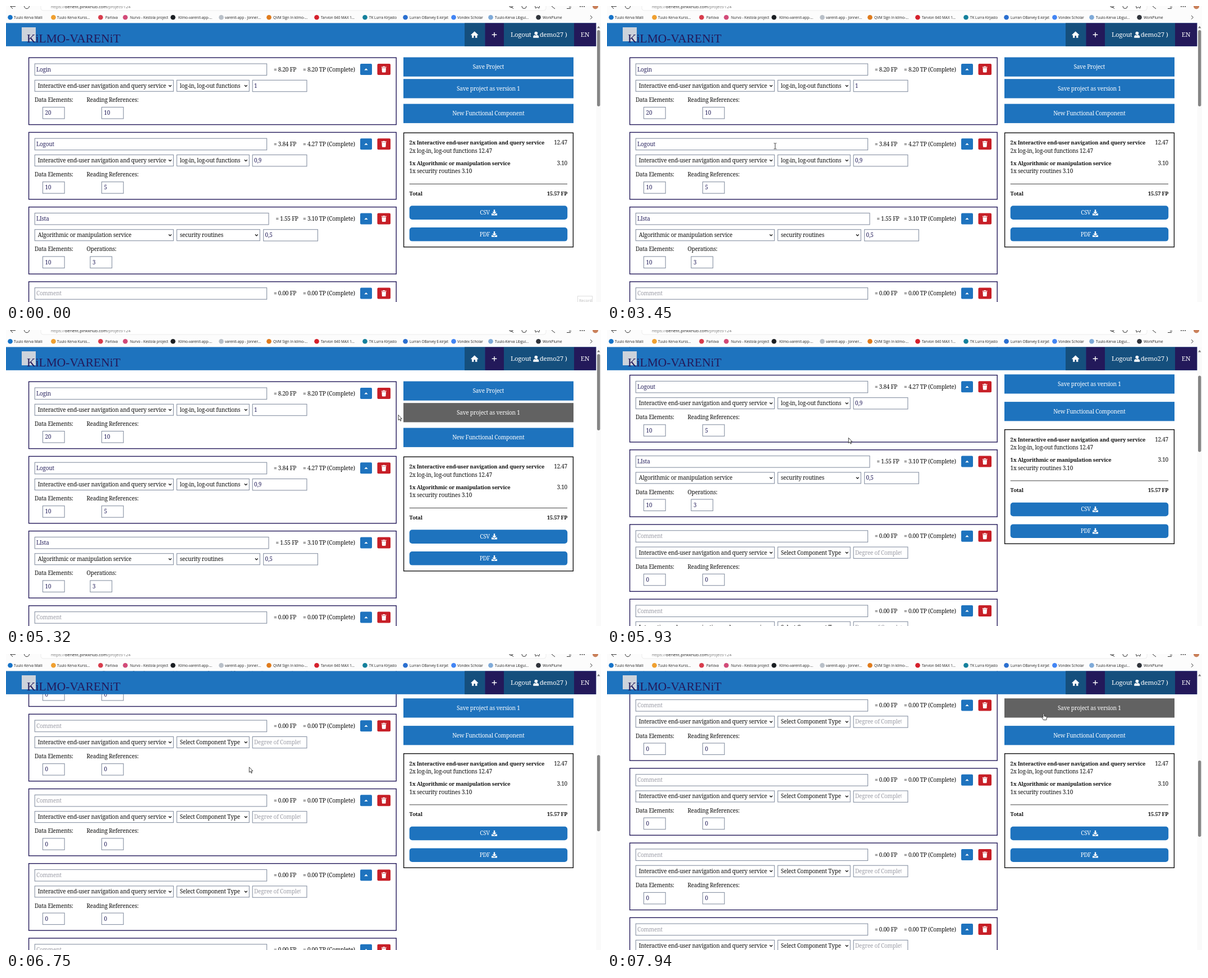
Write an HTML page that moves like this. It is 1060 by 528 pixels and loops after 8000 ms.

```html
<!DOCTYPE html>
<html lang="en">
<head>
<meta charset="utf-8">
<title>Function point calculator</title>
<style>
  html, body { margin: 0; width: 100%; height: 100%; overflow: hidden; background: #fff; }
  svg { display: block; width: 1060px; height: 528px; }
  text { font: 10px "Noto Serif", serif; letter-spacing: -.02em; fill: #111; white-space: pre; }
  .bold { font-size: 9.35px; font-weight: 700; }
  .value { fill: #2a2560; }
  .hint { fill: #9b9ca6; }
  .white { fill: #fff; }
  .nav { font-size: 11.5px; fill: #fff; }
  .ui { font: 6.4px "Open Sans", sans-serif; letter-spacing: 0; fill: #222; }
  .url { font-size: 7.35px; fill: #777; }
  .logo { font: 21.5px "Liberation Serif", serif; letter-spacing: 0; fill: #23195a; }
  .field { fill: #fff; stroke: #8791a3; stroke-width: 1.1; }
  .frame { fill: #fff; stroke: #23195a; stroke-width: 1.4; }
  .line { fill: none; stroke: #333; stroke-width: 1; }
  .blue { fill: #1e73be; }
  .hover { fill: #626262; }
</style>
</head>
<body>
<svg id="stage" viewBox="0 0 1060 528">
  <defs>
    <clipPath id="hintClip"><rect x="439" y="130" width="85.5" height="24"/></clipPath>
    <path id="trash" fill="#fff" d="M-4.4-4.6h2.6l.6-.9h2.4l.6.9h2.6v1.3h-8.8zM-3.8-2.6h7.6l-.5 7.2q-.1.9-1 .9h-4.6q-.9 0-1-.9z"/>
    <path id="caret" fill="#fff" d="M-3.2 1.6 0-1.7 3.2 1.6z"/>
    <path id="chevron" fill="none" stroke="#111" stroke-width="1.3" d="M-2.4-1.2 0 1.2 2.4-1.2"/>
    <path id="download" fill="#fff" d="M-1.2-5h2.4v4h2.6L0 2.9-3.8-1h2.6zM-5 1.8h2.6L0 4.2l2.4-2.4H5v3.3H-5z"/>
    <path id="home" fill="#fff" d="M0-6 6.6.1 5.7 1.1 4.7.3v5.2H1.3V1.8h-2.6v3.7h-3.4V.3l-1 .8-.9-1z"/>
    <path id="person" fill="#fff" d="M0-5.6a2.8 2.9 0 0 1 0 5.8a2.8 2.9 0 0 1 0-5.8M-5 5.5v-1.6q0-3 3-3.1q2 1 4 0q3 .1 3 3.1v1.6z"/>
  </defs>
  <g id="cards"></g>
  <g id="side"></g>
  <g id="chrome"></g>
  <rect id="thumb" x="1053" y="43" width="5.4" height="136" rx="2.7" fill="#858585"/>
  <g id="record">
    <rect x="1018.5" y="517.5" width="26" height="14" fill="#fff" stroke="#ddd"/>
    <text class="ui" x="1021" y="528" style="fill:#bbb;font-size:7px">Record</text>
  </g>
  <g id="pointer" stroke="#111" stroke-width=".8" stroke-linejoin="round" fill="#fff">
    <path id="arrow" d="M.3.3v9.4l2.2-2 1.5 3.4 1.4-.6L4 7.2h2.8z"/>
    <path id="hand" d="M-1.2 1.2q1.1-1.7 2.1 0v3.6l3.8.8q1 .3.9 1.4l-.8 4.6h-5.2l-3-4.2q0-1.3 1-1l1.2 1z"/>
    <path id="beam" fill="none" d="M-2.4-5H-.6L0-4.5.6-5h1.8M0-4.5v9M-2.4 5H-.6L0 4.5.6 5h1.8"/>
  </g>
</svg>
<script>
const el = id => document.getElementById(id);
const text = (x, y, str, cls = "", extra = "") => `<text x="${x}" y="${y}" class="${cls}" ${extra}>${str}</text>`;
const rect = (x, y, w, h, cls, extra = "") => `<rect x="${x}" y="${y}" width="${w}" height="${h}" class="${cls}" ${extra}/>`;
const fill = (x, y, w, h, color) => rect(x, y, w, h, "", `fill="${color}"`);
const icon = (id, x, y) => `<use href="#${id}" x="${x}" y="${y}"/>`;
const END = 'text-anchor="end"', MIDDLE = 'text-anchor="middle"';

// Functional component cards
const PITCH = 133.2;
const QUERY = "Interactive end-user navigation and query service";
const LOGIN = "log-in, log-out functions";
const empty = { type: QUERY, part: "Select Component Type", fp: "0.00", tp: "0.00", a: 0, b: 0 };
const items = [
  { name: "Login", type: QUERY, part: LOGIN, degree: "1", fp: "8.20", tp: "8.20", a: 20, b: 10 },
  { name: "Logout", type: QUERY, part: LOGIN, degree: "0,9", fp: "3.84", tp: "4.27", a: 10, b: 5 },
  { name: "LIsta", type: "Algorithmic or manipulation service", part: "security routines",
    degree: "0,5", fp: "1.55", tp: "3.10", a: 10, b: 3, wide: true },
  ...Array(6).fill(empty)
];

function select(x, w, str) {
  return rect(x, 132.3, w, 20, "field") + text(x + 5.5, 145.8, str) + icon("chevron", x + w - 6, 142.3);
}

function small(x, value) {
  return rect(x, 180.5, 38.7, 20.5, "field") + text(x + 4, 194.2, value, "value");
}

function card(item, i) {
  const { wide } = item, nameW = wide ? 416.7 : 413.3, degreeX = wide ? 458.7 : 439.2;
  return `<g transform="translate(0 ${i * PITCH})">` +
    rect(40.6, 92.2, 654.6, 119.4, "frame") +
    rect(51.3, 103, nameW, 20.6, "field") +
    text(54, 116.7, item.name || "Comment", item.name ? "value" : "hint") +
    text(wide ? 480.5 : 477, 116.7, `= ${item.fp} FP`) +
    text(621.7, 116.7, `= ${item.tp} TP (Complete)`, "", END) +
    rect(631, 103, 21, 20, "blue", 'rx="2"') + icon("caret", 641.5, 113) +
    rect(661.5, 103, 23.5, 20, "", 'rx="2" fill="#c71f27"') + icon("trash", 673.2, 113) +
    select(51.3, 247, item.type) + select(304.3, wide ? 148 : 129, item.part) +
    rect(degreeX, 132.3, 96.7, 20.4, "field") +
    (item.degree ? text(degreeX + 2.8, 145.8, item.degree, "value")
      : text(442, 145.8, "Degree of Completion", "hint", 'clip-path="url(#hintClip)"')) +
    text(51, 171, "Data Elements:") + text(143.5, 171, wide ? "Operations:" : "Reading References:") +
    small(65.5, item.a) + small(wide ? 150 : 170.5, item.b) + "</g>";
}
el("cards").innerHTML = items.map(card).join("");

// Sticky side column: each block stops after its own travel
const blocks = [
  { y: 91.5, travel: 400, label: "Save Project" },
  { y: 130.2, travel: 51, label: "Save project as version 1" },
  { y: 174.6, travel: 46.5, label: "New Functional Component" },
  { travel: 48.6 }
];

function exportButton(y, label) {
  return rect(718.7, y, 281.5, 24.6, "blue", 'rx="5"') +
    text(853, y + 15.8, label, "white", MIDDLE) + icon("download", 870, y + 12);
}

const summary = rect(708.6, 226.3, 301.8, 203.6, "frame", 'style="stroke:#111"') +
  text(718.6, 247.3, "2x " + QUERY, "bold") + text(1000, 247.3, "12.47", "", END) +
  text(718.6, 261.8, `2x ${LOGIN} 12.47`) +
  text(718.6, 284, "1x Algorithmic or manipulation service", "bold") + text(1000, 284, "3.10", "", END) +
  text(718.6, 298.2, "1x security routines 3.10") +
  fill(718.7, 317, 281.3, 1, "#444") +
  text(718.6, 337.6, "Total", "bold") + text(1000, 337.6, "15.57 FP", "bold", END) +
  exportButton(356.3, "CSV") + exportButton(395, "PDF");

el("side").innerHTML = blocks.map(b => `<g>${b.label
  ? rect(708, b.y, 303, 34.3, "blue") + text(859.3, b.y + 20.4, b.label, "white", MIDDLE)
  : summary}</g>`).join("");
const blockNodes = [...el("side").children];

// Browser bars and page header
const bookmarks = [
  [3, 14, "#1673c8", "Tuulo Kerva Maili"], [80, 91, "#f0a030", "Tuulo Kerva Kurss..."],
  [164, 177, "#d83c4c", "Parlova"], [208, 221, "#d24a78", "Nurvo - Kestola project"],
  [293, 307, "#1b1f23", "Kilmo-varenit-app-..."], [379, 390, "#b9c0c8", "varenit-app - Jonner..."],
  [464, 476, "#e07b1c", "QVM Sign In kilmo-..."], [549, 561, "#d5202c", "Tarvion 640 MAX 1..."],
  [635, 647, "#14809c", "TK Lurra Kirjasto"], [707, 719, "#2a6fd0", "Lurran OBarvey E-kirjat"],
  [793, 804, "#4285f4", "Vondex Scholar"], [859, 871, "#7faad8", "Tuulo-Kerva Libgui..."],
  [944, 956, "#30343b", "WorkPlume"]
];
const disc = (x, y, r, color) => `<circle cx="${x}" cy="${y}" r="${r}" fill="${color}"/>`;
const ring = (x, y, r) => `<circle cx="${x}" cy="${y}" r="${r}" class="line"/>`;

el("chrome").innerHTML =
  fill(0, 0, 1060, 30.5, "#fcfcfc") +
  rect(62, -12, 900, 20, "", 'rx="4" fill="#fff" stroke="#e6e6e6" stroke-width=".7"') +
  '<path class="line" d="M12-3 8 .8 12 5M8 .8h9M897-2l3 3 4 4M942-2l1.5 6 3-2 3 2 1.500-6M971-1l3 3 4 3M999 4.500h7M1003 2h4"/>' +
  ring(37, .2, 4.5) + ring(900, -.5, 3.2) + ring(923, .5, 4) +
  [1023, 1026.5, 1030].map(x => disc(x, 1, .9, "#333")).join("") + disc(1050, .5, 5, "#c9805a") +
  text(80, 3.8, 'https://<tspan fill="#222">benefit.pinkkhub.com</tspan>/project/124', "ui url") +
  bookmarks.map(([x, tx, color, label]) => disc(x + 4.5, 20.3, 4.3, color) + text(tx, 22.7, label, "ui")).join("") +
  '<path class="line" d="M1041 17l3.200 3.300-3.200 3.300"/>' +
  fill(0, 30.4, 1051.5, 41.4, "#1e73be") +
  fill(817, 30.4, 36.3, 41.4, "#154f7d") + fill(853.3, 30.4, 33.7, 41.4, "#23195a") +
  fill(887, 30.4, 125, 41.4, "#154f7d") + fill(1012, 30.4, 39.5, 41.4, "#23195a") +
  fill(28, 38, 25, 25, "#cdd3db") + text(37, 64.5, "KiLMO-VARENiT", "logo") +
  icon("home", 834.7, 51.3) + '<path d="M865.700 51.300h8.600M870 47v8.600" stroke="#fff" stroke-width="1.400"/>' +
  text(899, 55.3, "Logout", "nav") + icon("person", 944.2, 51.3) +
  text(999.5, 55.3, "( demo27 )", "nav", END) + text(1031.5, 55.3, "EN", "nav", MIDDLE) +
  fill(1051.5, 30.4, 8.5, 498, "#fafafa") + '<path fill="#777" d="M1053 39.500l2.700-3.800 2.700 3.800z"/>';

// Motion: [time, x, y] for the pointer, [time, offset] for the wheel scroll
const path = [
  [0, 1032, 540], [70, 1020, 530], [210, 840, 450], [350, 560, 340], [490, 350, 250], [620, 240, 205],
  [690, 217, 195], [1040, 217, 195], [1090, 216, 194], [1490, 217, 194], [2240, 217, 194], [2290, 218, 195],
  [2560, 218, 195], [2640, 222, 200], [3040, 298, 249], [3390, 298, 249], [3450, 299, 250],
  [3600, 380, 225], [3900, 740, 140], [4050, 900, 122], [4200, 972, 118], [4270, 973, 118],
  [4500, 900, 120], [4800, 790, 123], [5040, 749, 122], [5180, 742, 130], [5250, 728, 143],
  [5320, 700, 151], [5390, 600, 165], [5530, 431, 188], [5730, 431, 188], [5930, 430, 192],
  [6280, 429, 201.5], [6660, 429, 201.5], [6750, 433, 201.5], [6950, 433, 201.5], [7100, 520, 170],
  [7250, 700, 115], [7390, 818, 106], [7440, 821, 106], [7680, 761, 105], [7940, 778, 106], [8000, 778, 106]
];
const wheel = [
  [0, 0], [5670, 0], [5730, 15], [5930, 144.6], [6280, 236], [6410, 277], [6560, 277],
  [6610, 300], [6750, 517.3], [6820, 543], [6900, 554.3], [8000, 554.3]
];

function sample(keys, t) {
  const i = Math.max(1, keys.findIndex(k => k[0] >= t));
  const a = keys[i - 1], b = keys[i], k = Math.max(0, (t - a[0]) / (b[0] - a[0]));
  return a.slice(1).map((v, n) => v + (b[n + 1] - v) * k);
}

const HOVER_LAG = 60;
const show = (id, on) => el(id).style.display = on ? "" : "none";

function blockUnder([x, y], scroll) {
  return blocks.findIndex(b => {
    const top = b.y - Math.min(scroll, b.travel);
    return b.label && x >= 708 && x <= 1011 && y >= Math.max(72, top) && y <= top + 34.3;
  });
}

function draw(t) {
  const [scroll] = sample(wheel, t), spot = sample(path, t);
  const hovered = blockUnder(sample(path, Math.max(0, t - HOVER_LAG)), scroll);
  el("cards").setAttribute("transform", `translate(0 ${-scroll})`);
  blockNodes.forEach((node, i) => {
    node.setAttribute("transform", `translate(0 ${-Math.min(scroll, blocks[i].travel)})`);
    if (blocks[i].label) node.firstChild.setAttribute("class", i === hovered ? "hover" : "blue");
  });
  el("thumb").setAttribute("y", 43 + scroll * .265);
  el("record").style.opacity = Math.max(0, 1 - t / 200);
  el("pointer").setAttribute("transform", `translate(${spot})`);
  const beam = t > 2960 && t < 3500, hand = blockUnder(spot, scroll) >= 0;
  show("beam", beam);
  show("hand", hand);
  show("arrow", !beam && !hand);
}

const start = performance.now();
function tick(now) {
  draw(Math.max(0, now - start) % 8000);
  requestAnimationFrame(tick);
}
draw(0);
requestAnimationFrame(tick);
</script>
</body>
</html>
```
